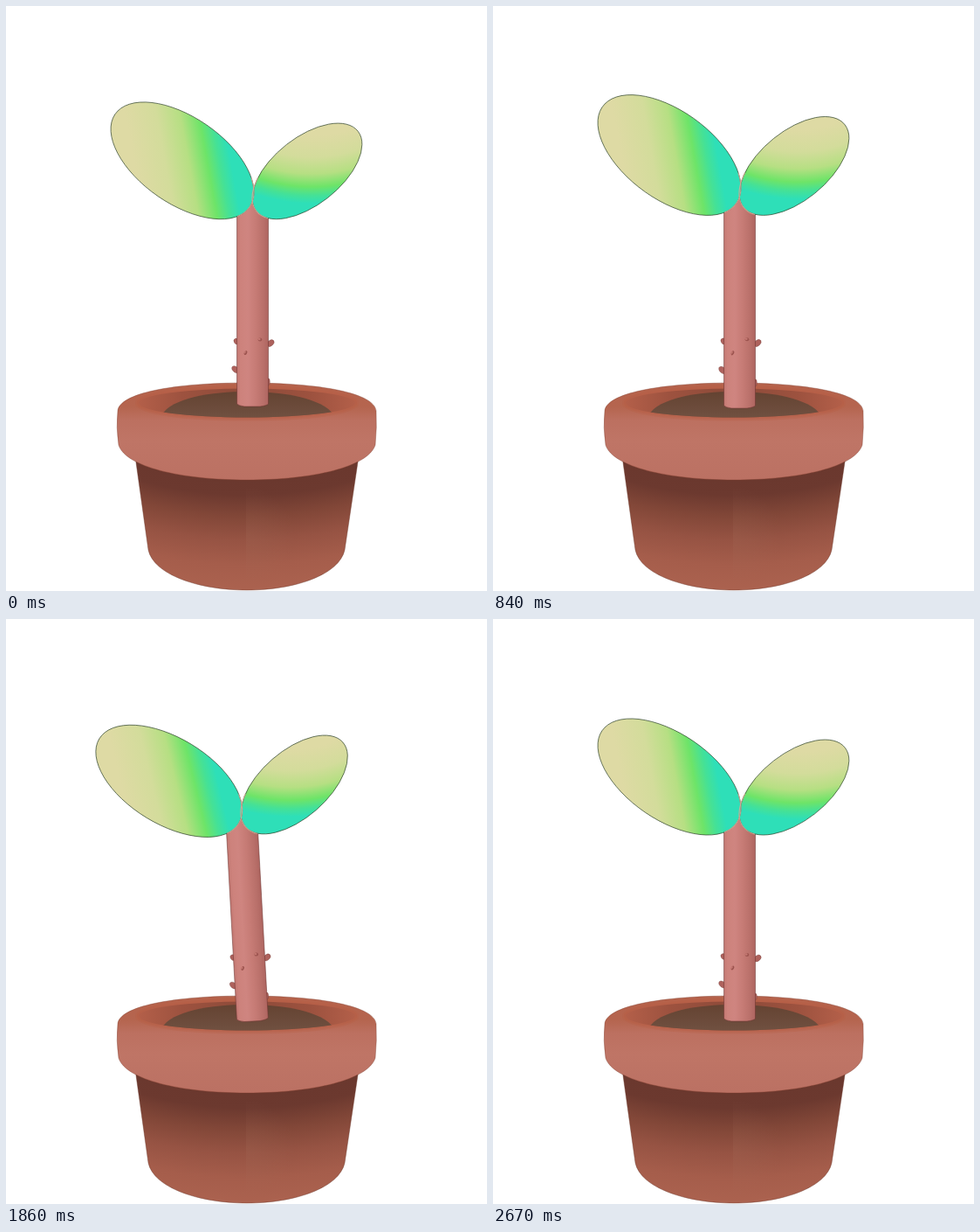
An HTML page with a canvas for the animation above (2.7 s loop, 551 by 669 pixels).

```html
<!DOCTYPE html>
<html lang="en">
<head>
<meta charset="utf-8">
<title>Sprout</title>
<style>
  html, body { margin: 0; width: 100%; height: 100%; overflow: hidden; background: #fff; }
  canvas { display: block; }
</style>
</head>
<body>
<canvas id="stage" width="551" height="669"></canvas>
<script>
const ctx = document.getElementById('stage').getContext('2d');
const LOOP = 2700, STEP = 30;
const PIVOT_X = 282;

// Keyframes: [time, value], linear in between
const stretchKeys = [[0, 1.006], [480, 1.143], [960, 1], [LOOP, 1]];
const baseKeys = [[0, 458], [480, 458], [780, 460], [LOOP, 460]];
const tiltKeys = [[0, 0], [960, 0], [1815, -4], [2295, 5], [2670, 0], [LOOP, 0]];

function valueAt(keys, t) {
  const i = keys.findIndex(([time]) => time > t);
  const [t0, v0] = keys[i - 1], [t1, v1] = keys[i];
  return v0 + (v1 - v0) * (t - t0) / (t1 - t0);
}

function withStops(gradient, stops) {
  stops.forEach(([at, color]) => gradient.addColorStop(at, color));
  return gradient;
}

const linear = (x0, y0, x1, y1, stops) =>
  withStops(ctx.createLinearGradient(x0, y0, x1, y1), stops);

const radial = (x, y, r0, r1, stops) =>
  withStops(ctx.createRadialGradient(x, y, r0, x, y, r1), stops);

const ellipse = (x, y, rx, ry, turn = 0) => {
  const path = new Path2D();
  path.ellipse(x, y, rx, ry, turn, 0, Math.PI * 2);
  return path;
};

function fill(path, style) {
  ctx.fillStyle = style;
  ctx.fill(path);
}

function stroke(path, style, width) {
  ctx.strokeStyle = style;
  ctx.lineWidth = width;
  ctx.stroke(path);
}

const body = new Path2D('M148 515 L163 622 C169 650 220 668 276 668 C332 668 382 650 388 622 L404 515 Z');
const rim = new Path2D('M128 463 C130 443 190 431 276 431 C362 431 422 443 424 463 Q425 482 423 502 C415 527 352 542 276 542 C200 542 137 527 129 502 Q126 482 128 463 Z');
const opening = ellipse(276, 454, 124, 16.5);
const soil = new Path2D('M178 468 C190 448 235 441 276 441 C317 441 362 448 376 468 L376 480 L178 480 Z');

const bodyPaint = radial(276, 108, 415, 560, [
  [0, '#69372d'], [0.25, '#6c392f'], [0.42, '#824738'], [0.6, '#965343'], [0.8, '#a55d4b'], [1, '#ab624f']
]);
const seamPaint = radial(275, 605, 0, 55, [[0, 'rgba(165,110,90,.2)'], [1, 'rgba(165,110,90,0)']]);
const rimPaint = linear(0, 431, 0, 542, [
  [0, '#b5624b'], [0.25, '#b5654f'], [0.38, '#bc7060'], [0.6, '#bf7566'], [1, '#bb7163']
]);
const openingPaint = linear(152, 0, 400, 0, [
  [0, '#b35f49'], [0.2, '#9d523f'], [0.5, '#8c4a39'], [0.8, '#9d523f'], [1, '#b35f49']
]);
const soilPaint = linear(0, 441, 0, 470, [[0, '#644332'], [1, '#705040']]);

function drawPot() {
  fill(body, bodyPaint);
  stroke(body, 'rgba(100,48,36,.5)', 0.8);
  ctx.save();
  ctx.clip(body);
  ctx.fillStyle = seamPaint;
  ctx.fillRect(275, 550, 55, 110);
  ctx.restore();

  fill(rim, rimPaint);
  stroke(rim, 'rgba(125,62,46,.5)', 0.8);
  stroke(opening, 'rgba(182,92,68,.3)', 8);
  stroke(opening, 'rgba(182,92,68,.4)', 4);
  fill(opening, openingPaint);
  ctx.save();
  ctx.clip(opening);
  fill(soil, soilPaint);
  ctx.restore();
}

const stem = new Path2D('M264.5 226 L282 218 L300.5 226 L300.5 457 Q299 459 291 460 L273 460 Q266 459 264.5 457 Z');
const stemPaint = linear(264, 0, 301, 0, [
  [0, '#c07670'], [0.12, '#cd827c'], [0.35, '#cf8580'], [0.6, '#c67b75'], [0.85, '#b86f69'], [1, '#ad645f']
]);
const leftLeaf = ellipse(202, 180.5, 93.4, 49.2, 0.599);
const rightLeaf = ellipse(345, 192.5, 73.8, 38.4, -0.66);
const leafStops = [
  [0, '#dedaa4'], [0.3, '#d3dc9b'], [0.53, '#b6df83'], [0.71, '#6ee468'], [0.83, '#45e196'], [0.94, '#2edfb8'], [1, '#2edfb8']
];
const leftPaint = linear(150, 199, 264, 178, leafStops);
const rightPaint = radial(350, 20, 132, 214, leafStops);

// Thorns: x, y, rx, ry, turn
const sideThorns = [
  [264, 386, 2.8, 3.5, -0.5], [303, 388, 4.6, 3.2, -0.7],
  [263, 418, 5, 3.2, 0.7], [300.5, 432, 1.8, 4, 0]
];
const frontThorns = [[291, 384, 2.3, 2, 0], [274.5, 399, 1.6, 2.6, 0.5]];

function drawLeaf(leaf, paint) {
  fill(leaf, paint);
  stroke(leaf, 'rgba(50,70,46,.8)', 0.9);
}

function drawPlant(stretch, baseY, tilt) {
  ctx.save();
  ctx.translate(PIVOT_X, baseY);
  ctx.rotate(tilt * Math.PI / 180);
  ctx.scale(1, stretch);
  ctx.translate(-PIVOT_X, -460);

  for (const thorn of sideThorns) {
    const shape = ellipse(...thorn);
    fill(shape, '#ae625d');
    stroke(shape, 'rgba(95,45,42,.5)', 0.6);
  }
  fill(stem, stemPaint);
  stroke(stem, 'rgba(105,50,46,.65)', 0.8);
  for (const [x, y, rx, ry, turn] of frontThorns) {
    fill(ellipse(x, y, rx, ry, turn), '#9c544f');
    fill(ellipse(x - 0.8, y - 0.5, rx * 0.6, ry * 0.6, turn), '#c47872');
  }

  drawLeaf(rightLeaf, rightPaint);
  drawLeaf(leftLeaf, leftPaint);
  // pale rim where the leaves meet the stem
  ctx.save();
  ctx.beginPath();
  ctx.rect(265, 200, 35, 48);
  ctx.clip();
  stroke(leftLeaf, 'rgba(212,170,150,.9)', 1.1);
  stroke(rightLeaf, 'rgba(212,170,150,.9)', 1.1);
  ctx.restore();
  ctx.restore();
}

const start = performance.now();

function render() {
  const elapsed = (performance.now() - start) % LOOP;
  const t = Math.floor(elapsed / STEP) * STEP;
  ctx.fillStyle = '#fff';
  ctx.fillRect(0, 0, 551, 669);
  drawPot();
  drawPlant(valueAt(stretchKeys, t), valueAt(baseKeys, t), valueAt(tiltKeys, t));
  requestAnimationFrame(render);
}
render();
</script>
</body>
</html>
```
